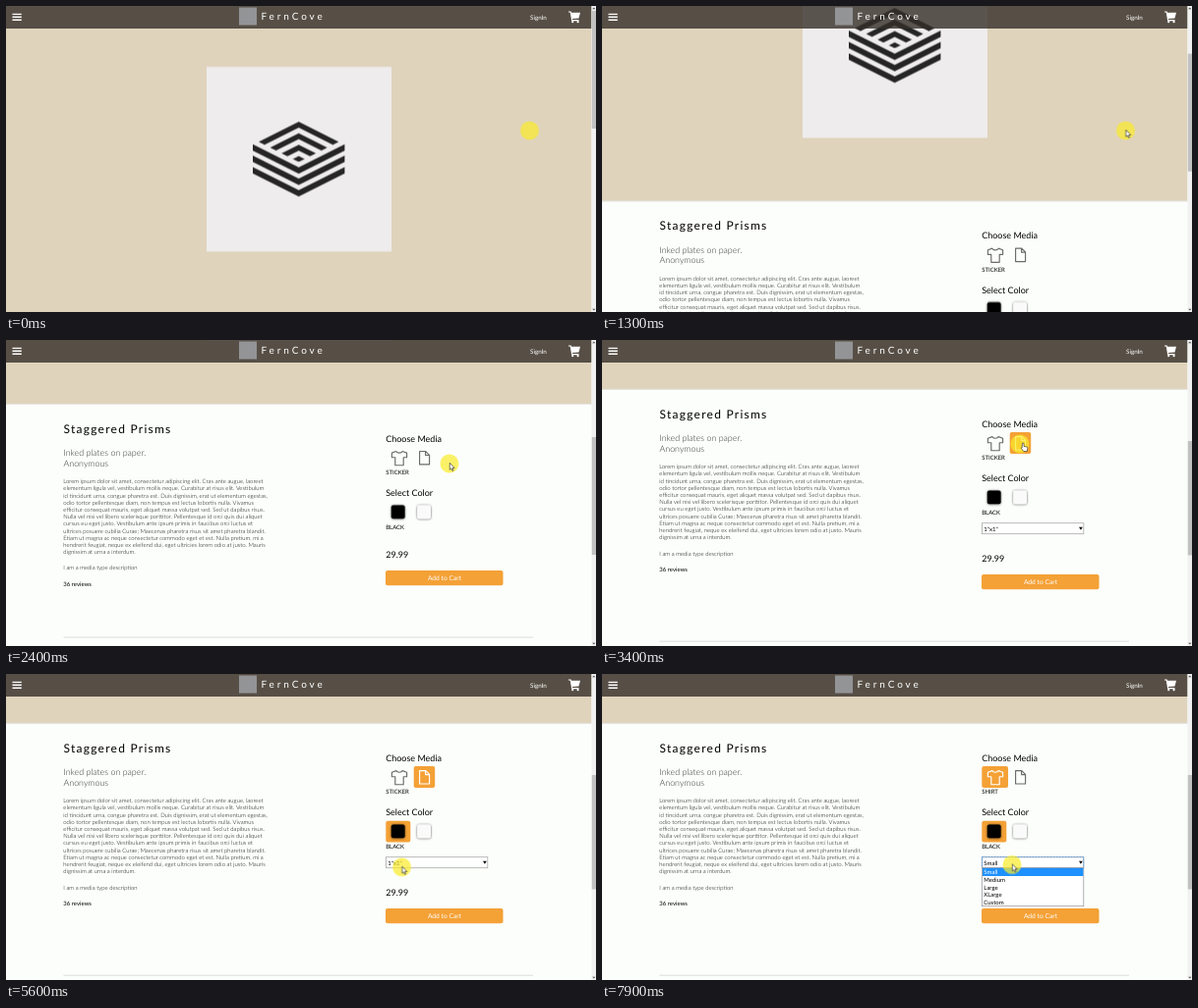
Recreate the animation shown at these times as an HTML page. Size 600 by 312 pixels, loop 8000 ms.

```html
<!DOCTYPE html>
<html lang="en">
<head>
<meta charset="utf-8">
<title>Shop page</title>
<style>
html, body { margin: 0; width: 100%; height: 100%; overflow: hidden; background: #fcfefb; }
svg { display: block; width: 600px; height: 312px; }
text { font-family: Lato, "Open Sans", sans-serif; font-size: 6px; fill: #000; white-space: pre; text-rendering: geometricPrecision; }
.title { font-size: 12px; letter-spacing: 1.25px; }
.head { font-size: 9px; }
.sub { font-size: 8.9px; font-weight: 300; fill: #333; }
.copy { font-size: 5.95px; font-weight: 300; }
.pick { fill: #f4a136; }
.icon { fill: none; stroke: #6b6b6b; stroke-width: 1.15; stroke-linejoin: round; }
.white { stroke: #fff; }
.list rect { fill: #fff; stroke: #8a8f96; stroke-width: .7; }
.list .hit { fill: #1e90ff; stroke: none; }
.list .hot { fill: #fff; }
.focus { fill: none; stroke: #3f8fe0; stroke-width: .8; stroke-dasharray: 2 1; }

/* Continuous motion */
#page, #thumb, #cursor { animation: 8s linear infinite; }
#page { animation-name: scroll; }
#thumb { animation-name: thumb; }
#cursor { animation-name: cursor; }
@keyframes scroll {
  0% { transform: translateY(264.5px); animation-timing-function: cubic-bezier(.33, 0, .67, .35); }
  11.25% { transform: translateY(214px); animation-timing-function: cubic-bezier(.33, .22, .67, .75); }
  21.25% { transform: translateY(80.5px); animation-timing-function: cubic-bezier(.33, .44, .67, .77); }
  30% { transform: translateY(15px); animation-timing-function: cubic-bezier(.33, .43, .67, 1); }
  33.75%, 100% { transform: none; }
}
@keyframes thumb {
  0% { transform: translateY(5px); height: 120px; animation-timing-function: cubic-bezier(.33, 0, .67, .35); }
  11.25% { transform: translateY(24px); animation-timing-function: cubic-bezier(.33, .22, .67, .75); }
  21.25% { transform: translateY(74.3px); animation-timing-function: cubic-bezier(.33, .44, .67, .77); }
  30% { transform: translateY(99px); animation-timing-function: cubic-bezier(.33, .43, .67, 1); }
  33.75%, 37.49% { transform: translateY(104.6px); height: 120px; }
  37.5%, 100% { transform: translateY(103px); height: 116.5px; }
}
@keyframes cursor {
  0%, 25% { transform: translate(532.5px, 127px); animation-timing-function: ease-in-out; }
  30% { transform: translate(451px, 126px); }
  33.75% { transform: translate(430px, 108px); }
  36.25%, 45% { transform: translate(425px, 106px); }
  50% { transform: translate(410px, 211px); }
  52.5% { transform: translate(400px, 163px); }
  55% { transform: translate(424px, 161px); }
  57.5%, 61.25% { transform: translate(424.5px, 161px); }
  63.75%, 68.75% { transform: translate(400px, 161px); }
  71.25% { transform: translate(405px, 232px); }
  73.75%, 75% { transform: translate(425px, 193px); animation-timing-function: ease-in-out; }
  78.75% { transform: translate(404px, 114px); }
  82.5% { transform: translate(406.5px, 121.5px); }
  85% { transform: translate(402px, 114px); }
  87.5%, 91.25% { transform: translate(400px, 106px); animation-timing-function: ease-in-out; }
  96.25%, 100% { transform: translate(417px, 194.5px); }
}

/* Hard switches */
.step { animation: 8s step-end infinite; }
#late { animation-name: late; }
#select { animation-name: select; }
#paper { animation-name: paper; }
#shirt { animation-name: shirt; }
#black { animation-name: black; }
#white { animation-name: white; }
#white-name { animation-name: whiteName; }
#black-name { animation-name: blackName; }
.sticker { animation-name: sticker; }
.tee { animation-name: tee; }
#sizes { animation-name: sizes; }
#fits { animation-name: fits; }
#hand { animation-name: hand; }
#arrow { animation-name: arrow; }
@keyframes late { 0% { transform: translateY(-19px); } 37.5%, 100% { transform: none; } }
@keyframes select { 0% { opacity: 0; } 37.5%, 100% { opacity: 1; } }
@keyframes paper { 0% { opacity: 0; } 35% { opacity: 1; } 90%, 100% { opacity: 0; } }
@keyframes shirt { 0% { opacity: 0; } 87.5%, 100% { opacity: 1; } }
@keyframes black { 0%, 53.75% { opacity: 0; } 52.5%, 63.75%, 100% { opacity: 1; } }
@keyframes white { 0% { opacity: 0; } 55% { opacity: 1; } 66.25%, 100% { opacity: 0; } }
@keyframes whiteName { 0% { opacity: 0; } 58.75% { opacity: 1; } 66.25%, 100% { opacity: 0; } }
@keyframes blackName { 0% { opacity: 1; } 58.75% { opacity: 0; } 66.25%, 100% { opacity: 1; } }
@keyframes sticker { 0% { opacity: 1; } 90%, 100% { opacity: 0; } }
@keyframes tee { 0% { opacity: 0; } 90%, 100% { opacity: 1; } }
@keyframes sizes { 0% { opacity: 0; } 73.75% { opacity: 1; } 85%, 100% { opacity: 0; } }
@keyframes fits { 0% { opacity: 0; } 96.25%, 100% { opacity: 1; } }
@keyframes hand { 0%, 46.25%, 70%, 92.5%, 100% { opacity: 0; } 35%, 52.5%, 87.5% { opacity: 1; } }
@keyframes arrow { 0%, 35%, 52.5%, 87.5% { opacity: 0; } 1.25%, 46.25%, 70%, 92.5%, 100% { opacity: 1; } }
</style>
</head>
<body>
<svg viewBox="0 0 600 312">
  <defs>
    <path id="roof" d="M250.7 141.7L297.7 118l47 23.7v6L297.7 124l-47 23.7z"/>
    <path id="fold" d="M251 141l46.7 23.5L344.4 141v6.5L297.7 171 251 147.5z"/>
    <clipPath id="top"><path d="M251 135.5L297.7 159l46.7-23.5V110H251z"/></clipPath>
    <path id="tee-shape" d="M396.8 98.6l-4.4 1.6v4.6h3.4v8h8.4v-8h3.4v-4.6l-4.4-1.6c-1 2.2-5.400 2.2-6.400 0z"/>
    <path id="sheet-shape" d="M420.6 98.6h6.2l3.8 3.8v9.6h-10zM426.6 98.8v3.8h3.8"/>
    <filter id="soft" x="-40%" y="-40%" width="180%" height="180%">
      <feDropShadow dx="0" dy=".3" stdDeviation="1.2" flood-color="#000" flood-opacity=".7"/>
    </filter>
  </defs>

  <rect width="600" height="312" fill="#fcfefb"/>

  <g id="page">
    <g transform="translate(0 -264.5)">
      <rect y="314" width="595.5" height="1.2" fill="#dcdbd6"/>
      <rect width="595.5" height="314.4" fill="#dfd3bc"/>
      <rect x="204" y="62" width="188" height="188.4" fill="#eeecec"/>
      <g fill="#262525">
        <g clip-path="url(#top)">
          <use href="#roof"/>
          <use href="#roof" y="11.7"/>
          <use href="#roof" y="23.4"/>
          <use href="#roof" y="35.1"/>
        </g>
        <use href="#fold"/>
        <use href="#fold" y="11.6"/>
        <use href="#fold" y="23.2"/>
      </g>
    </g>

    <text class="title" x="58.5" y="79.9">Staggered Prisms</text>
    <text class="sub" x="58.5" y="103">Inked plates on paper.</text>
    <text class="sub" x="58.5" y="113.8">Anonymous</text>
    <text class="copy" y="131.2">
      <tspan x="58.3">Lorem ipsum dolor sit amet, consectetur adipiscing elit. Cras ante augue, laoreet</tspan>
      <tspan x="58.3" dy="7.2">elementum ligula vel, vestibulum mollis neque. Curabitur at risus elit. Vestibulum</tspan>
      <tspan x="58.3" dy="7.2">id tincidunt urna, congue pharetra est. Duis dignissim, erat ut elementum egestas,</tspan>
      <tspan x="58.3" dy="7.2">odio tortor pellentesque diam, non tempus est lectus lobortis nulla. Vivamus</tspan>
      <tspan x="58.3" dy="7.2">efficitur consequat mauris, eget aliquet massa volutpat sed. Sed ut dapibus risus.</tspan>
      <tspan x="58.3" dy="7.2">Nulla vel nisi vel libero scelerisque porttitor. Pellentesque id orci quis dui aliquet</tspan>
      <tspan x="58.3" dy="7.2">cursus eu eget justo. Vestibulum ante ipsum primis in faucibus orci luctus et</tspan>
      <tspan x="58.3" dy="7.2">ultrices posuere cubilia Curae; Maecenas pharetra risus sit amet pharetra blandit.</tspan>
      <tspan x="58.3" dy="7.2">Etiam ut magna ac neque consectetur commodo eget et est. Nulla pretium, mi a</tspan>
      <tspan x="58.3" dy="7.2">hendrerit feugiat, neque ex eleifend dui, eget ultricies lorem odio at justo. Mauris</tspan>
      <tspan x="58.3" dy="7.2">dignissim at urna a interdum.</tspan>
    </text>
    <text class="copy" x="58.3" y="219.5">I am a media type description</text>
    <text x="58.3" y="236.1">36 reviews</text>

    <text class="head" x="386.2" y="88.6">Choose Media</text>
    <use href="#tee-shape" class="icon"/>
    <use href="#sheet-shape" class="icon"/>
    <g id="shirt" class="step">
      <rect class="pick" x="386.3" y="94" width="26.7" height="22" rx="2"/>
      <use href="#tee-shape" class="icon white"/>
    </g>
    <g id="paper" class="step">
      <rect class="pick" x="414.7" y="94" width="21.5" height="22" rx="2"/>
      <use href="#sheet-shape" class="icon white"/>
    </g>
    <text class="step sticker" x="386.2" y="122.1">STICKER</text>
    <text class="step tee" x="386.2" y="122.1">SHIRT</text>

    <text class="head" x="386.2" y="144.2">Select Color</text>
    <rect id="black" class="step pick" x="386.3" y="149.7" width="25" height="21.8" rx="2"/>
    <rect id="white" class="step pick" x="412.9" y="149.7" width="25" height="21.8" rx="2"/>
    <g filter="url(#soft)">
      <rect x="391.8" y="153.4" width="13.8" height="13.8" rx="2"/>
      <rect x="418.2" y="153.4" width="13.8" height="13.8" rx="2" fill="#fafafa"/>
    </g>
    <text id="black-name" class="step" x="386.2" y="177.6">BLACK</text>
    <text id="white-name" class="step" x="386.2" y="177.6">WHITE</text>

    <g id="late" class="step">
      <text class="head" x="386.2" y="225.8">29.99</text>
      <rect class="pick" x="386" y="239" width="119.5" height="15.3" rx="2"/>
      <text x="446" y="249.1" text-anchor="middle" style="font-size:6.7px;fill:#fff">Add to Cart</text>
      <rect x="58.5" y="306.7" width="477.5" height="1" fill="#dcdddc"/>
    </g>

    <g id="select" class="step">
      <rect x="386.5" y="186.7" width="103.3" height="11" fill="#fff" stroke="#a9a9a9" stroke-width=".8"/>
      <path d="M485 190.7h3.8l-1.9 3z"/>
      <text class="step sticker" x="388.3" y="194.6">1"x1"</text>
      <text class="step tee" x="388.3" y="194.6">Small</text>
    </g>
    <g id="sizes" class="step list">
      <path class="focus" d="M386.5 186.7h103.3v11H386.5z"/>
      <rect x="386.5" y="197.7" width="103.3" height="39"/>
      <rect class="hit" x="387" y="198" width="102.4" height="8"/>
      <text class="hot" x="388.3" y="204.2">1"x1"</text>
      <text x="388.3" y="212">2"x2"</text>
      <text x="388.3" y="219.7">3"x3"</text>
      <text x="388.3" y="227.4">5"x5"</text>
      <text x="388.3" y="235.1">Custom</text>
    </g>
    <g id="fits" class="step list">
      <path class="focus" d="M386.5 186.7h103.3v11H386.5z"/>
      <rect x="386.5" y="197.7" width="103.3" height="39"/>
      <rect class="hit" x="387" y="198" width="102.4" height="8"/>
      <text class="hot" x="388.3" y="204.2">Small</text>
      <text x="388.3" y="212">Medium</text>
      <text x="388.3" y="219.7">Large</text>
      <text x="388.3" y="227.4">XLarge</text>
      <text x="388.3" y="235.1">Custom</text>
    </g>
  </g>

  <!-- Header -->
  <rect width="595.5" height="23" fill="#352f29" fill-opacity=".8"/>
  <path d="M6.5 8.4h9.3M6.5 11.3h9.3M6.5 14.2h9.3" stroke="#fff" stroke-width="1.4"/>
  <rect x="237" y="1.5" width="18" height="18" fill="#939496"/>
  <text x="259.5" y="14.3" style="font-size:10px;letter-spacing:2.9px;fill:#fff">FernCove</text>
  <text x="533" y="13.8" style="font-size:6.3px;fill:#fff">SignIn</text>
  <g fill="#fff">
    <path d="M572 5.4h2.6l.5 1.4h8.9l-1.5 5.6-6.6.7.3 1h6.3v1.1h-7.3L573.7 6.6H572z"/>
    <circle cx="576.2" cy="16.2" r="1.1"/>
    <circle cx="581.6" cy="16.2" r="1.1"/>
  </g>

  <!-- Scrollbar -->
  <rect x="595.5" width="4.5" height="312" fill="#f1f1f1"/>
  <path d="M596.2 3.2l1.6-1.8 1.6 1.8zM596.2 308.8l1.6 1.8 1.6-1.8z" fill="#555"/>
  <rect id="thumb" x="595.8" width="4.2" height="120" fill="#c1c1c1"/>

  <g id="cursor">
    <circle r="9.5" fill="#faeb28" fill-opacity=".7"/>
    <path id="arrow" class="step" d="M.3-.7v7l1.6-1.4 1.1 2.6 1.1-.5-1.1-2.5h2.2z" fill="#fff" stroke="#222" stroke-width=".6"/>
    <path id="hand" class="step" d="M3-1c.8 0 1 .4 1 1v2.4l3 .6c.7.2.9.6.8 1.3L7.3 7.5H3.7L1.5 4.5c-.4-.7.3-1.2.8-.8V0c0-.6.2-1 .7-1z" fill="#fff" stroke="#222" stroke-width=".6"/>
  </g>
</svg>
</body>
</html>
```
